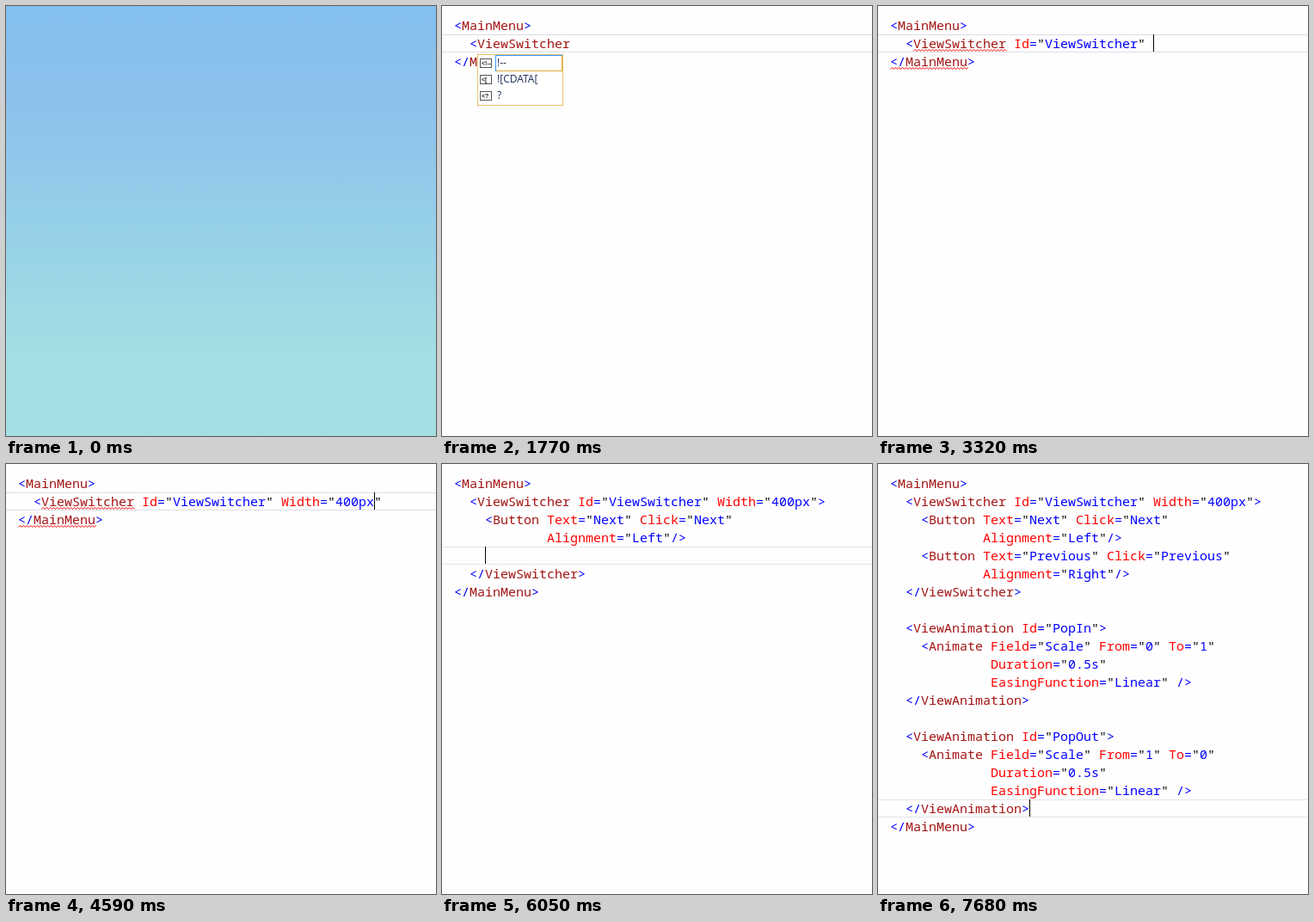
An HTML page with a canvas for the animation above (8000 ms loop, 500x500 px).

```html
<!DOCTYPE html>
<html lang="en">
<head>
<meta charset="utf-8">
<title>Markup editor</title>
<style>
  html, body { margin: 0; width: 100%; height: 100%; overflow: hidden; background: #fefefe; }
  canvas { display: block; width: 100vw; height: 100vh; }
</style>
</head>
<body>
<canvas id="stage" width="500" height="500"></canvas>
<script>
const ctx = document.getElementById('stage').getContext('2d');
const LOOP = 8000, LEFT = 14, TOP = 12, CHAR = 9, ROW = 21;
const CODE_FONT = '15px "Noto Sans Mono", "DejaVu Sans Mono", monospace';
const COLOR = { mark: '#0000ff', tag: '#a31515', attr: '#ff0000', quote: '#000000' };

// In every text "|" is the visible caret and "¦" a caret in its dark phase.
const open = '<MainMenu>\n', close = '\n</MainMenu>', closeView = '\n  </ViewSwitcher>';
const view = '  <ViewSwitcher Id="ViewSwitcher" Width="400px">';
const pad = n => ' '.repeat(n);
const wrap = body => open + body + close;
const inView = body => wrap(view + '\n' + body + closeView);
const button = (name, side, indent = 12, before = '', after = '') =>
  `    <Button Text="${name}" Click="${name}"\n${pad(indent)}${before}Alignment="${side}"/>${after}`;
const animation = (id, from, to) =>
  `  <ViewAnimation Id="${id}">\n    <Animate Field="Scale" From="${from}" To="${to}"\n` +
  `${pad(13)}Duration="0.5s"\n${pad(13)}EasingFunction="Linear" />\n  </ViewAnimation>`;

const next = button('Next', 'Left');
const both = next + '\n' + button('Previous', 'Right');
const withPrevious = (...args) => inView(next + '\n' + button('Previous', 'Right', ...args));

const steps = [[500, wrap('')]];
const add = (time, text) => steps.push([time, text]);
const type = (prefix, list) => list.forEach(([time, text]) => add(time, wrap(prefix + text)));

type('  ', [
  [780, '|'], [980, '<|'], [1130, '<Vi|'], [1290, '<View|'],
  [1450, '<ViewSwi|'], [1610, '<ViewSwitch|'], [1770, '<ViewSwitcher¦']
]);
type('  <ViewSwitcher ', [
  [1970, '|'], [2130, 'I|'], [2290, 'Id|'], [2450, 'Id="|"'], [2610, 'Id="Vi|"'],
  [2770, 'Id="ViewS|"'], [2930, 'Id="ViewSwitc|"'], [3050, 'Id="ViewSwitch|"'],
  [3200, 'Id="ViewSwitcher"|'], [3320, 'Id="ViewSwitcher" |']
]);
type('  <ViewSwitcher Id="ViewSwitcher" ', [
  [3440, 'W|'], [3710, 'Wi|'], [3860, 'Widt|'], [4000, 'Width|'], [4150, 'Width="|"'],
  [4300, 'Width="4|"'], [4450, 'Width="400|"'], [4590, 'Width="400px|"']
]);
add(4790, wrap(view + '|</ViewSwitcher>'));
add(4950, wrap(view + '\n  |</ViewSwitcher>'));
add(5110, inView('    |'));
add(5480, inView(button('Next', 'Left', 4, '', '|')));
add(5680, inView(button('Next', 'Left', 12, '|')));
add(5850, inView(next + '|'));
add(6050, inView(next + '\n    |'));
add(6330, withPrevious(4, '', '|'));
add(6530, withPrevious(4, '|'));
add(6730, withPrevious(8, '|'));
add(6930, withPrevious(12, '|'));
add(7130, wrap(view + '\n' + both + closeView + '\n  |'));
add(7400, wrap(view + '\n' + both + closeView + '\n\n  |'));
add(7680, wrap(view + '\n' + both + closeView + '\n\n' +
  animation('PopIn', 0, 1) + '\n\n' + animation('PopOut', 1, 0) + '|'));

const colX = col => LEFT + col * CHAR;
const rowY = row => TOP + row * ROW;

function rect(color, x, y, w, h) {
  ctx.fillStyle = color;
  ctx.fillRect(x, y, w, h);
}

function drawSky() {
  const sky = ctx.createLinearGradient(0, 0, 0, 500);
  [[0, '#84bfee'], [0.23, '#8dc1eb'], [0.48, '#95cee9'], [0.8, '#a2dee3'], [1, '#a3dfe2']]
    .forEach(([at, color]) => sky.addColorStop(at, color));
  rect(sky, 0, 0, 500, 500);
}

function drawLine(line, row) {
  ctx.font = CODE_FONT;
  let inString = false, previous = '';
  for (const match of line.matchAll(/<\/?|\/?>|[="]|[\w.]+/g)) {
    const token = match[0];
    let kind = 'mark';
    if (token === '"') {
      kind = 'quote';
      inString = !inString;
    } else if (!inString && /^\w/.test(token)) {
      kind = previous.startsWith('<') ? 'tag' : 'attr';
    }
    ctx.fillStyle = COLOR[kind];
    ctx.fillText(token, colX(match.index), rowY(row) + 16);
    previous = token;
  }
}

function drawSquiggle(from, to, row) {
  ctx.strokeStyle = '#ff0000';
  ctx.lineWidth = 1;
  ctx.beginPath();
  for (let x = colX(from), i = 0; x <= colX(to); x += 2, i++) {
    ctx.lineTo(x + 0.5, rowY(row) + (i % 2 ? 17.5 : 19.5));
  }
  ctx.stroke();
}

function drawPopup() {
  rect('#e5c365', 41, 56, 100, 60);
  rect('#ffffff', 42, 57, 98, 58);
  rect('#e0a83c', 62, 57, 78, 19);
  rect('#3399ff', 62, 57, 1, 19);
  rect('#3399ff', 62, 57, 78, 1);
  rect('#ffffff', 63, 58, 76, 17);
  [['<!--', '!--'], ['<[', '![CDATA['], ['<?', '?']].forEach(([icon, label], i) => {
    const y = 61 + i * 19;
    ctx.strokeStyle = '#555555';
    ctx.lineWidth = 1;
    ctx.strokeRect(44.5, y + 0.5, 13, 10);
    ctx.fillStyle = '#222222';
    ctx.font = 'bold 7px "Liberation Sans", sans-serif';
    ctx.fillText(icon, 46, y + 8);
    ctx.fillStyle = '#1e2d5a';
    ctx.font = '12px "Open Sans", sans-serif';
    ctx.fillText(label, 64, y + 9);
  });
}

function drawEditor(t) {
  const text = steps.filter(([time]) => time <= t).pop()[1];
  rect('#fefefe', 0, 0, 500, 500);
  const lines = text.split('\n');
  const row = lines.findIndex(line => /[|¦]/.test(line));
  if (row >= 0) {
    const edge = t < 5110 ? '#dcdce8' : '#e4e4ec';
    rect(edge, 0, rowY(row), 500, 1);
    rect(edge, 0, rowY(row) + 20, 500, 1);
  }
  lines.forEach((line, i) => drawLine(line.replace(/[|¦]/, ''), i));
  if (t >= 2450 && t < 4790) {
    drawSquiggle(3, 15, 1);
    drawSquiggle(0, 10, 2);
  }
  if (row >= 0 && lines[row].includes('|')) {
    rect('#000000', colX(lines[row].indexOf('|')), rowY(row), 1, 20);
  }
  if (t >= 980 && t < 1970) drawPopup();
}

function frame(now) {
  const t = now % LOOP;
  if (t < 500) drawSky();
  else drawEditor(t);
  requestAnimationFrame(frame);
}
requestAnimationFrame(frame);
</script>
</body>
</html>
```
